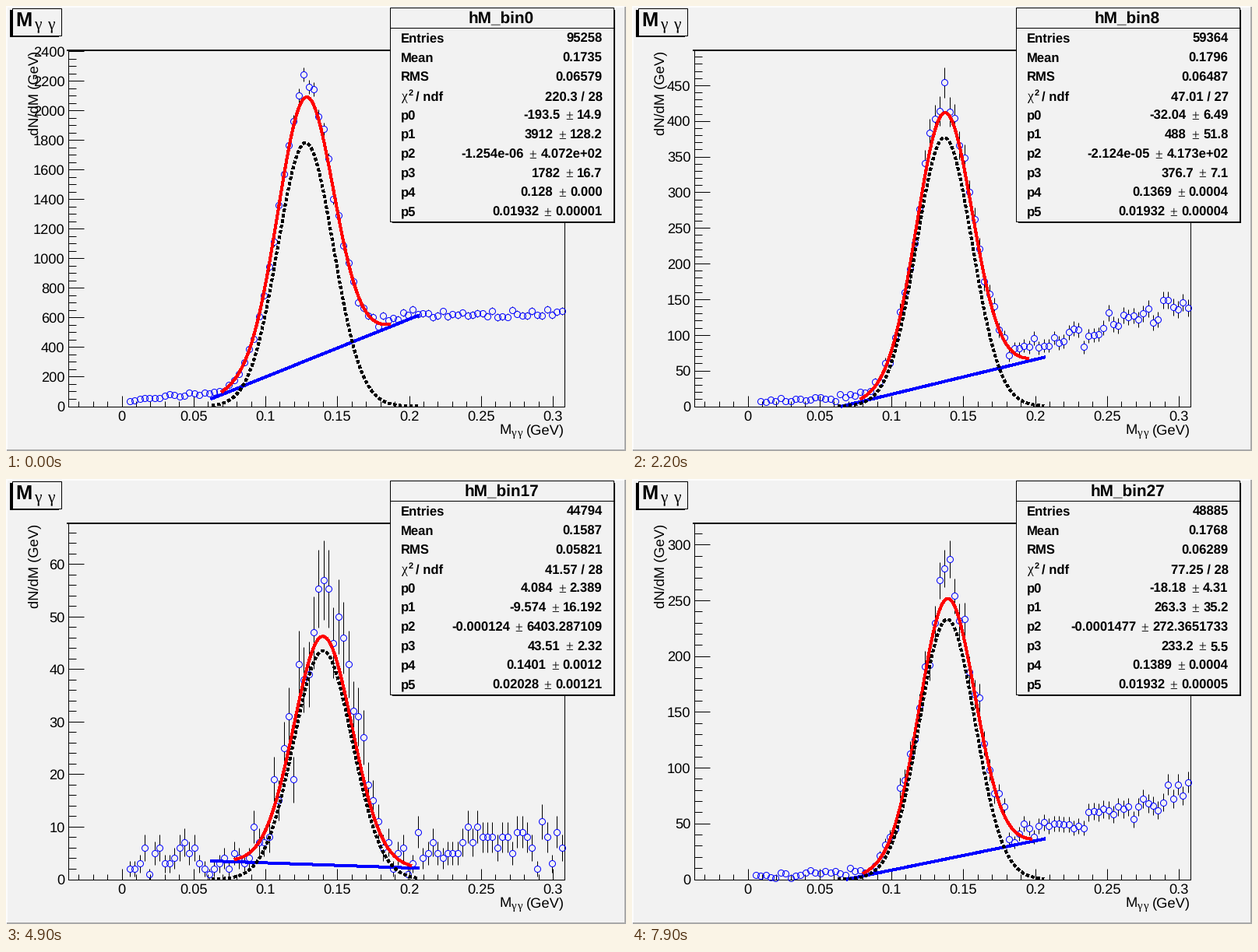
Recreate the animation shown at these times as a matplotlib script. Size 796 by 572 pixels, loop 8000 ms.

```python
import math
import numpy as np
import matplotlib.pyplot as plt
from matplotlib.animation import FuncAnimation
from matplotlib.collections import LineCollection
from matplotlib.patches import Rectangle

W, H, DPI = 796, 572, 64
PT = 72 / DPI                                    # points per pixel
LEFT, RIGHT, TOP, BOTTOM = 79.5, 716.5, 57, 514.5
X0, XSCALE = 148.5, 1845                         # pixel of zero, pixels per GeV
BG = "#f2f2f2"
SANS, SERIF = "Liberation Sans", "Liberation Serif"

BINS = np.arange(89)
MASS = (4.1 + 6.376 * BINS) / XSCALE             # bin centres in GeV
FIT_END = 52                                     # first bin right of the fit

runs = {}


def add_run(n, stats, fit, errors, top, tail):
    """Store a fit, its highest point and both ends of the flat tail."""
    p0, p1, p2, p3, p4, p5 = fit
    runs[n] = dict(
        stats=np.array(stats), errors=np.array(errors),
        line=np.array([p0, p1]) / p3, logs=np.log([-p2, p3]),
        peak=np.array([p4, p5]), levels=np.array([top, *tail]) / p3)


add_run(0, [95258, .1735, .06579, 220.3, 28],
        [-193.5, 3912, -1.254e-6, 1782, .128, .01932],
        [14.9, 128.2, 407.2, 16.7, .0001, .00001], 2245, (600, 645))
add_run(3, [42364, .175, .06239, 98.64, 27],
        [-29.29, 388.5, -4.451e-8, 375.9, .1369, .01932],
        [5.92, 47.5, 262.2, 7.0, .0003, .00002], 470, (60, 118))
add_run(8, [59364, .1796, .06487, 47.01, 27],
        [-32.04, 488, -2.124e-5, 376.7, .1369, .01932],
        [6.49, 51.8, 417.3, 7.1, .0004, .00004], 454, (72, 150))
add_run(13, [80742, .1847, .06578, 136.1, 27],
        [-79.29, 1008, -2.294e-8, 501.9, .136, .01932],
        [8.05, 66.2, 260.8, 8.5, .0003, .00002], 668, (130, 245))
add_run(17, [44794, .1587, .05821, 41.57, 28],
        [4.084, -9.574, -.000124, 43.51, .1401, .02028],
        [2.389, 16.192, 6403.287109, 2.32, .0012, .00121], 57, (5, 8))
add_run(23, [49490, .1653, .05519, 67.93, 27],
        [-19.1, 208.8, -7.609e-8, 289.4, .1397, .01932],
        [4.4, 34.7, 275.3, 5.8, .0004, .00003], 365, (27, 50))
add_run(27, [48885, .1768, .06289, 77.25, 28],
        [-18.18, 263.3, -.0001477, 233.2, .1389, .01932],
        [4.31, 35.2, 272.3651733, 5.5, .0004, .00005], 287, (39, 80))


def blend(n):
    """Return run n, mixed from its stored neighbours when it is not stored."""
    lo = max(k for k in runs if k <= n)
    hi = min(k for k in runs if k >= n)
    w = (n - lo) / (hi - lo) if hi > lo else 0
    return {key: (1 - w) * runs[lo][key] + w * runs[hi][key] for key in runs[lo]}


def gauss(x, amp, mean, sigma):
    return amp * np.exp(-0.5 * ((x - mean) / sigma) ** 2)


def heights(n, fit, top, tail_start, tail_end):
    """Counts that follow the fit, overshoot it at the peak and scatter."""
    p0, p1, _, p3, mean, sigma = fit
    curve = p0 + p1 * MASS + gauss(MASS, p3, mean, sigma)
    excess = gauss(MASS, 0.8 * (top / curve.max() - 1), mean, 0.4 * sigma)
    head = tail_start * (0.06 + 0.12 * BINS / 20)
    tail = np.interp(BINS, [FIT_END, BINS[-1]], [tail_start, tail_end])
    level = np.where(BINS < FIT_END, np.maximum(curve * (1 + excess), head), tail)
    level[0] = 0
    noise = np.random.default_rng(n + 5).normal(size=len(BINS))
    v = np.clip(np.round(level + 0.8 * noise * np.sqrt(level)), 0, 0.97 * top)
    v[np.argmin(abs(MASS - mean))] = top
    return v


def tick_step(ymax):
    raw = ymax / 10
    unit = 10 ** math.floor(math.log10(raw))
    lead = next((s for s, limit in ((1, 1), (2, 2.5), (5, 5)) if raw / unit <= limit), 10)
    return lead * unit, lead * unit / (4 if lead == 2 else 5)


def with_error(value, error):
    a = f"{value:.4g}"
    if "e" in a:
        return a, f"{error:.3e}"
    digits = len(a.split(".")[1]) if "." in a else 1
    return a, f"{error:.{digits}f}"


def text_width(s, size):
    em = {".": .278, "-": .333, "+": .584}
    return size * sum(em.get(c, .556) for c in s)


plt.rcParams["text.hinting"] = "none"
fig = plt.figure(figsize=(W / DPI, H / DPI), dpi=DPI, facecolor=BG)
ax = fig.add_axes([0, 0, 1, 1])
ax.set(xlim=(0, W), ylim=(H, 0))
ax.axis("off")


def rect(x, y, w, h, color, z=0, edge="none"):
    ax.add_patch(Rectangle((x, y), w, h, fc=color, ec=edge, lw=PT, zorder=z))


def text(x, y, s, size, ha="left", bold=False, font=SANS, z=12, **kw):
    return ax.text(x, y, s, fontsize=size * PT, ha=ha, va="baseline", family=font,
                   weight="bold" if bold else "normal", zorder=z, **kw)


def curve_line(color, width, z, **kw):
    return ax.plot([], [], color=color, lw=width * PT, zorder=z,
                   antialiased=False, **kw)[0]


def strokes(segments=(), z=2):
    lines = LineCollection(list(segments), colors="k", linewidths=PT, zorder=z)
    ax.add_collection(lines, autolim=False)
    return lines


# canvas bevel
rect(0, 0, W, 2, "#fcfcfc")
rect(0, 0, 2, H, "#fcfcfc")
rect(W - 2, 1, 2, H, "#a9a9a9")
rect(1, H - 2, W, 2, "#a9a9a9")

# title box
rect(5, 5, 63, 35, "k", 1)
rect(7.5, 2.5, 63, 35, BG, 1.1, "k")
text(12, 26, "M", 25.5, bold=True)
text(36, 29, "γ", 21.5, font=SERIF)
text(53, 29, "γ", 21.5, font=SERIF)

# plot frame and x axis
ax.plot([LEFT, LEFT, RIGHT, RIGHT], [TOP, BOTTOM, BOTTOM, TOP], "k", lw=PT, zorder=2)
ax.plot([LEFT - .5, RIGHT + .5], [TOP, TOP], "k", lw=2 * PT, zorder=2)
xticks = []
for i in range(-3, 31):
    px = X0 + i * 0.01 * XSCALE
    major = i % 5 == 0 and i >= 0
    xticks.append([(px, BOTTOM), (px, BOTTOM - (14 if major else 7))])
    if major:
        text(px, 533, f"{i / 100:g}", 18.3, "center")
strokes(xticks)
text(633, 550, "M", 18.4)
text(648.5, 554, "γ", 15, font=SERIF)
text(656, 554, "γ", 15, font=SERIF)
text(716.5, 550, "(GeV)", 18.4, "right")
text(41, 58, "dN/dM (GeV)", 18.4, "right", rotation=90, rotation_mode="anchor", z=3)

# statistics box
SIZE, EDGE = 16.6, 765.5
ROWS = 47 + 24.78 * np.arange(10)
rect(496, 5, 286, 274, "k", 10)
rect(493, 2, 287, 275, BG, 10.1, "k")
ax.plot([493, 780], [27.5, 27.5], "k", lw=PT, zorder=11)
for y, label in zip(ROWS, ["Entries", "Mean", "RMS", "", *(f"p{i}" for i in range(6))]):
    text(507, y, label, SIZE, bold=True)
text(507, ROWS[3], "χ", SIZE + 1, font=SERIF)
text(516.5, ROWS[3] - 6, "2", 11, bold=True)
text(526.5, ROWS[3], "/ ndf", SIZE, bold=True)

# moving parts
name = text(636, 21, "", 20.8, "center", bold=True)
values = [text(EDGE, y, "", SIZE, "right", bold=True) for y in ROWS]
firsts = [text(0, y, "", SIZE, "right", bold=True) for y in ROWS[4:]]
signs = [text(0, y, "±", SIZE + 1, "center", font=SERIF) for y in ROWS[4:]]
ylabels = [text(75.5, 0, "", 18.3, "right", z=3) for _ in range(15)]
yticks = strokes()
bars = strokes(z=4)
points = ax.plot([], [], "o", ms=8 * PT, mfc="none", mec="blue", mew=PT, zorder=4)[0]
ground = curve_line("blue", 3, 5)
total = curve_line("red", 3, 6)
signal = curve_line("black", 3.3, 7, dashes=(1.2, 1.0), dash_capstyle="butt")


def draw_axis(ymax, to_y):
    step, minor = tick_step(ymax)
    per = round(step / minor)
    yticks.set_segments([[(LEFT, to_y(i * minor)),
                          (LEFT + (10 if i % per else 20), to_y(i * minor))]
                         for i in range(int(ymax / minor) + 1)])
    for i, label in enumerate(ylabels):
        shown = i * step <= ymax
        label.set_text(f"{i * step:g}" if shown else "")
        label.set_y(to_y(i * step) + 6.5 if shown else 0)


def draw_points(v, to_y):
    px = X0 + MASS * XSCALE
    segments = []
    for x, count in zip(px, v):
        y, root = to_y(count), math.sqrt(count)
        high, low = to_y(count + root), min(to_y(count - root), BOTTOM)
        if count and high < y - 4:
            segments.append([(x, y - 4), (x, high)])
        if count and low > y + 4:
            segments.append([(x, y + 4), (x, low)])
    bars.set_segments(segments)
    points.set_data(px[v > 0], to_y(v[v > 0]))


def draw_stats(n, stats, fit, errors):
    entries, mean, rms, chi2, ndf = stats
    name.set_text(f"hM_bin{n}")
    lines = [f"{entries:.0f}", f"{mean:.4g}", f"{rms:.4g}", f"{chi2:.4g} / {ndf:.0f}"]
    for label, line in zip(values, lines):
        label.set_text(line)
    for i in range(6):
        a, b = with_error(fit[i], errors[i])
        start = EDGE - text_width(b, SIZE)
        values[i + 4].set_text(b)
        signs[i].set_x(start - 10)
        firsts[i].set_text(a)
        firsts[i].set_x(start - 21.5)


def update(frame):
    n = (frame + 2) // 3
    run = blend(n)
    p2, p3 = np.exp(run["logs"])
    p0, p1 = run["line"] * p3
    mean, sigma = run["peak"]
    fit = [p0, p1, -p2, p3, mean, sigma]
    v = heights(n, fit, *(run["levels"] * p3))
    ymax = 1.05 * (v.max() + math.sqrt(v.max()))

    def to_y(value):
        return BOTTOM - value * (BOTTOM - TOP) / ymax

    def plot(line, x, y):
        line.set_data(X0 + x * XSCALE, to_y(np.where(y >= 0, y, np.nan)))

    draw_axis(ymax, to_y)
    draw_points(v, to_y)
    wide = np.linspace(0.0628, 0.2062, 300)
    near = np.linspace(mean - 3 * sigma, mean + 3 * sigma, 300)
    plot(ground, wide, p0 + p1 * wide)
    plot(signal, wide, gauss(wide, p3, mean, sigma))
    plot(total, near, p0 + p1 * near + gauss(near, p3, mean, sigma))
    draw_stats(n, run["stats"], fit, run["errors"])
    return []


anim = FuncAnimation(fig, update, frames=80, interval=100, repeat=True,
                     repeat_delay=0, blit=False)
plt.show()
```
